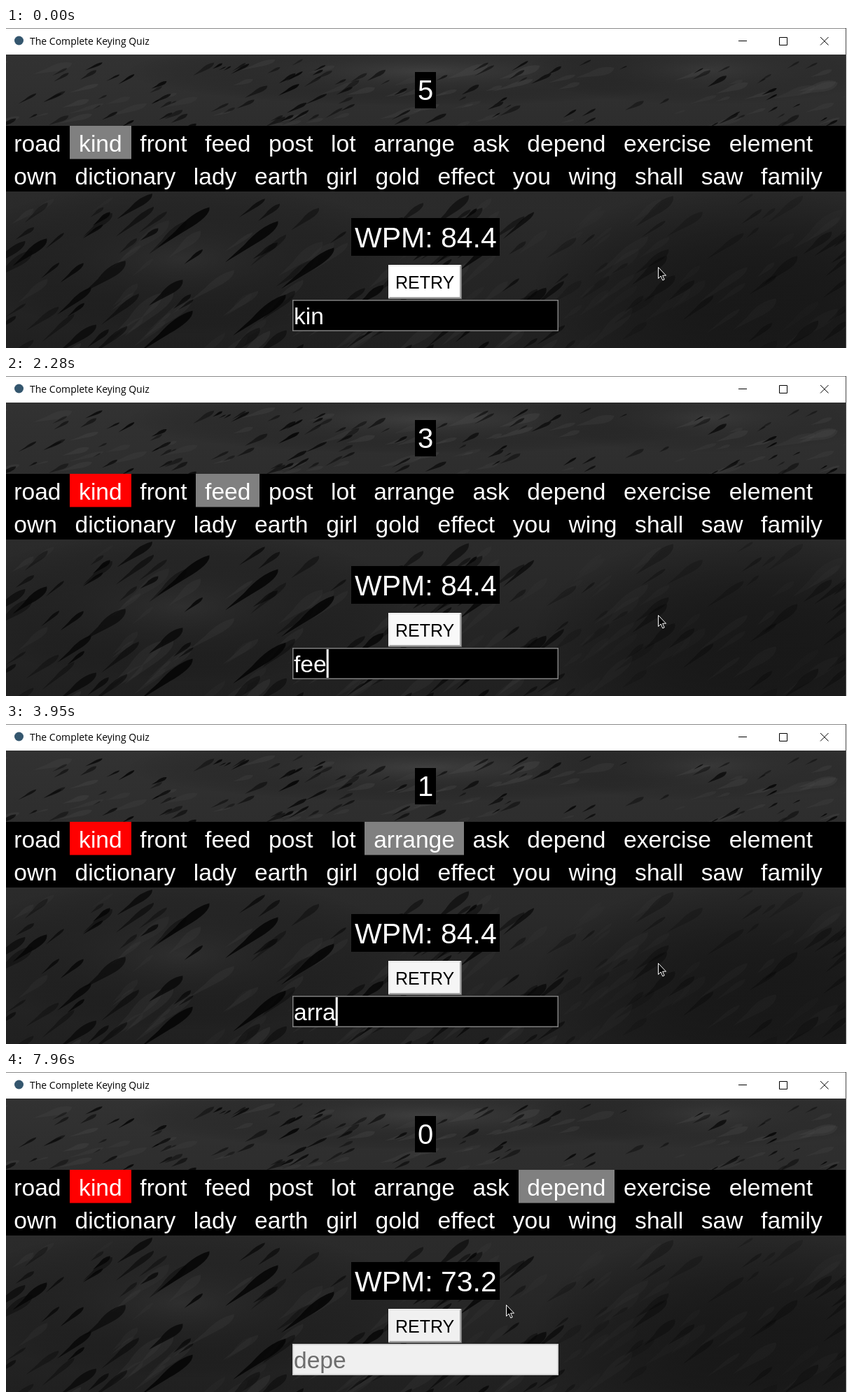
An HTML page with a canvas that plays this animation: 1201x458 px, repeating every 8000 ms.

```html
<!DOCTYPE html>
<html lang="en">
<head>
<meta charset="utf-8">
<title>Keying Quiz</title>
<style>
  html, body { margin: 0; width: 100%; height: 100%; overflow: hidden; background: #222; }
  canvas, svg { position: absolute; left: 0; top: 0; display: block; }
  text { font-family: "Liberation Sans", Arial, sans-serif; fill: #fff; white-space: pre; }
  .title { font: 14px "Open Sans", "Noto Sans", sans-serif; fill: #000; }
</style>
</head>
<body>
<canvas id="ground" width="1201" height="458"></canvas>
<svg id="ui" width="1201" height="458" viewBox="0 0 1201 458"></svg>
<script>
const LOOP = 8000;
const TIME_UP = 5850;
const WORD_SIZE = 33.6;
const WORD_PAD = 12.8;
const ui = document.getElementById('ui');
const ctx = document.getElementById('ground').getContext('2d');
const clamp = (v, low, high) => Math.min(high, Math.max(low, v));

// ---- backdrop: dark ground with slanted shadows ----

let seed = 11;
function random() {
  seed = (seed * 16807) % 2147483647;
  return seed / 2147483647;
}
const between = (a, b) => a + (b - a) * random();

function glow(x, y, rx, ry, color, alpha) {
  ctx.save();
  ctx.translate(x, y);
  ctx.scale(rx, ry);
  const g = ctx.createRadialGradient(0, 0, 0, 0, 0, 1);
  g.addColorStop(0, color);
  g.addColorStop(1, 'transparent');
  ctx.globalAlpha = alpha;
  ctx.fillStyle = g;
  ctx.fillRect(-1, -1, 2, 2);
  ctx.restore();
}

// A rounded head at (x, y) with a tail tapering down to the left.
function streak(x, y, length, width, slope, color, alpha) {
  ctx.save();
  ctx.translate(x, y);
  ctx.rotate(Math.PI - Math.atan(slope));
  ctx.globalAlpha = alpha;
  ctx.fillStyle = color;
  ctx.beginPath();
  ctx.moveTo(length, 0);
  ctx.lineTo(length * 0.45, -width * 0.4);
  ctx.quadraticCurveTo(0, -width * 0.8, -width * 0.4, 0);
  ctx.quadraticCurveTo(length * 0.2, width * 0.7, length * 0.6, width * 0.2);
  ctx.fill();
  ctx.restore();
}

function scatter(count, top, bottom, length, slope, color, alpha) {
  for (let i = 0; i < count; i++) {
    const x = between(0, 1240);
    const size = length * between(0.4, 1.3);
    const fade = top > 200 && x > 800 ? 0.5 : 1;
    streak(x, between(top, bottom), size, size * between(0.12, 0.26), slope * between(0.85, 1.15), color, alpha * fade * between(0.4, 1));
  }
}

function drawGround() {
  const g = ctx.createLinearGradient(0, 38, 0, 458);
  g.addColorStop(0, '#323232');
  g.addColorStop(0.2, '#2e2e2e');
  g.addColorStop(0.55, '#2a2a2a');
  g.addColorStop(1, '#202020');
  ctx.fillStyle = g;
  ctx.fillRect(0, 0, 1201, 458);

  glow(600, 62, 430, 50, '#484848', 0.6);
  glow(1000, 60, 260, 50, '#424242', 0.45);
  glow(250, 330, 330, 110, '#343434', 0.6);
  glow(1080, 370, 330, 150, '#141414', 0.7);

  scatter(60, 45, 138, 45, 0.3, '#4c4c4c', 0.35);
  scatter(90, 240, 455, 70, 0.8, '#3c3c3c', 0.35);
  scatter(110, 45, 138, 26, 0.55, '#060606', 0.9);
  scatter(130, 238, 455, 52, 0.78, '#060606', 0.85);

  const boulders = [[384, 280], [464, 318], [262, 408], [395, 385], [286, 260]];
  for (const [x, y] of boulders) streak(x, y, 90, 14, 0.78, '#060606', 0.9);
}

// ---- interface ----

function add(tag, attrs, content) {
  const el = document.createElementNS('http://www.w3.org/2000/svg', tag);
  for (const key in attrs) el.setAttribute(key, attrs[key]);
  if (content !== undefined) el.textContent = content;
  return ui.appendChild(el);
}
const rect = (x, y, width, height, fill) => add('rect', { x, y, width, height, fill });
const label = (x, y, size, content, attrs) => add('text', { x, y, 'font-size': size, ...attrs }, content);
const path = (d, attrs) => add('path', { d, fill: 'none', stroke: '#000', ...attrs });

function textWidth(text) {
  ctx.font = WORD_SIZE + 'px "Liberation Sans", Arial, sans-serif';
  return ctx.measureText(text).width;
}

// Sets words side by side, each padded on both sides.
function layRow(words) {
  let x = -1.5;
  return words.split(' ').map(word => {
    const cell = { word, x, width: textWidth(word) + 2 * WORD_PAD };
    x += cell.width;
    return cell;
  });
}

function titleBar() {
  rect(0, 0, 1199, 38, '#fff');
  rect(0, 0, 1201, 1, '#8a8a8a');
  rect(1199, 0, 1, 458, '#4a4a4a');
  rect(1200, 0, 1, 458, '#fff');
  add('circle', { cx: 18.5, cy: 18, r: 6.5, fill: '#34566e' });
  add('text', { x: 34, y: 24, class: 'title' }, 'The Complete Keying Quiz');
  path('M1046 18.5H1058M1104.5 13.5H1115.5V24.5H1104.5ZM1163 13L1174.5 24.5M1174.5 13L1163 24.5');
}

const rows = [
  layRow('road kind front feed post lot arrange ask depend exercise element'),
  layRow('own dictionary lady earth girl gold effect you wing shall saw family')
];

function highlight(color) {
  return rect(0, 140, 0, 47.5, color);
}
function cover(box, cell) {
  const left = Math.round(cell.x);
  box.setAttribute('x', left);
  box.setAttribute('width', Math.round(cell.x + cell.width) - left);
}

drawGround();
titleBar();

rect(584, 63, 30, 52, '#000');
const counter = label(599, 103, 40, '5', { 'text-anchor': 'middle' });

rect(0, 140, 1199, 94, '#000');
const wrong = highlight('#f00');
const current = highlight('#808080');
cover(wrong, rows[0][1]);
rows.forEach((row, i) => {
  for (const cell of row) label(cell.x + WORD_PAD, 177 + 47 * i, WORD_SIZE, cell.word);
});

rect(493, 272, 212, 54, '#000');
const speed = label(498, 314, 41, '');

rect(546, 339, 105, 49, '#696969');
rect(546, 339, 103.5, 47.5, '#fff');
rect(547.5, 340.5, 102, 46, '#a0a0a0');
const button = rect(547.5, 340.5, 100.5, 44.5, '#fff');
label(556, 373, 25, 'RETRY', { style: 'fill:#000' });

const frame = rect(409, 389, 380, 45, '#808080');
const field = rect(410.5, 390.5, 377, 42, '#000');
const typed = label(411, 424, WORD_SIZE, '');
const caret = rect(0, 391, 3, 41, '#fff');

const pointer = path('M.5 .5V16.5L4.2 13L6.8 19L9.2 18L6.6 12.2H11.5Z', { fill: '#000', stroke: '#fff' });

// ---- timeline ----

// Keys typed for each word from the second on, first key time, time the word is done.
const entries = [
  ['kinf ', -270, 390],
  ['front', 850, 1830],
  ['feed', 1980, 2410],
  ['post', 2550, 3140],
  ['lot', 3280, 3480],
  ['arrange', 3560, 4400],
  ['ask ', 4450, 5010],
  ['dep', 5010, 5430]
];

function typing(t) {
  const found = entries.findIndex(entry => t < entry[2]);
  const index = found < 0 ? entries.length - 1 : found;
  const [keys, first, done] = entries[index];
  const count = Math.floor((t - first) / (done - first) * keys.length) + 1;
  return { index: index + 1, text: keys.slice(0, clamp(count, 0, keys.length)) };
}

function render(t) {
  const over = t >= TIME_UP;
  const { index, text } = typing(t);

  counter.textContent = Math.max(0, 5 - Math.floor((t + 150) / 950));
  speed.textContent = 'WPM: ' + (over ? '73.2' : '84.4');
  cover(current, rows[0][index]);
  wrong.setAttribute('visibility', index > 1 ? 'visible' : 'hidden');

  const shade = Math.round(255 - 15 * Math.min(1, t / TIME_UP));
  button.setAttribute('fill', `rgb(${shade},${shade},${shade})`);
  frame.setAttribute('fill', over ? '#c8c8c8' : '#808080');
  field.setAttribute('fill', over ? '#f0f0f0' : '#000');
  typed.textContent = over ? 'depe' : text;
  typed.style.fill = over ? '#6d6d6d' : '#fff';

  const lit = !over && (t + 256) % 966 >= 290;
  caret.setAttribute('x', 411 + textWidth(text));
  caret.setAttribute('visibility', lit ? 'visible' : 'hidden');

  // The pointer jumps to its new place in two hops.
  const hop = clamp(Math.floor((t - 7720) / 120), 0, 2) / 2;
  pointer.setAttribute('transform', `translate(${Math.round(931 - 217 * hop)} ${Math.round(342 - 9 * hop)})`);
}

const start = performance.now();
function tick() {
  render((performance.now() - start) % LOOP);
  requestAnimationFrame(tick);
}
tick();
</script>
</body>
</html>
```
